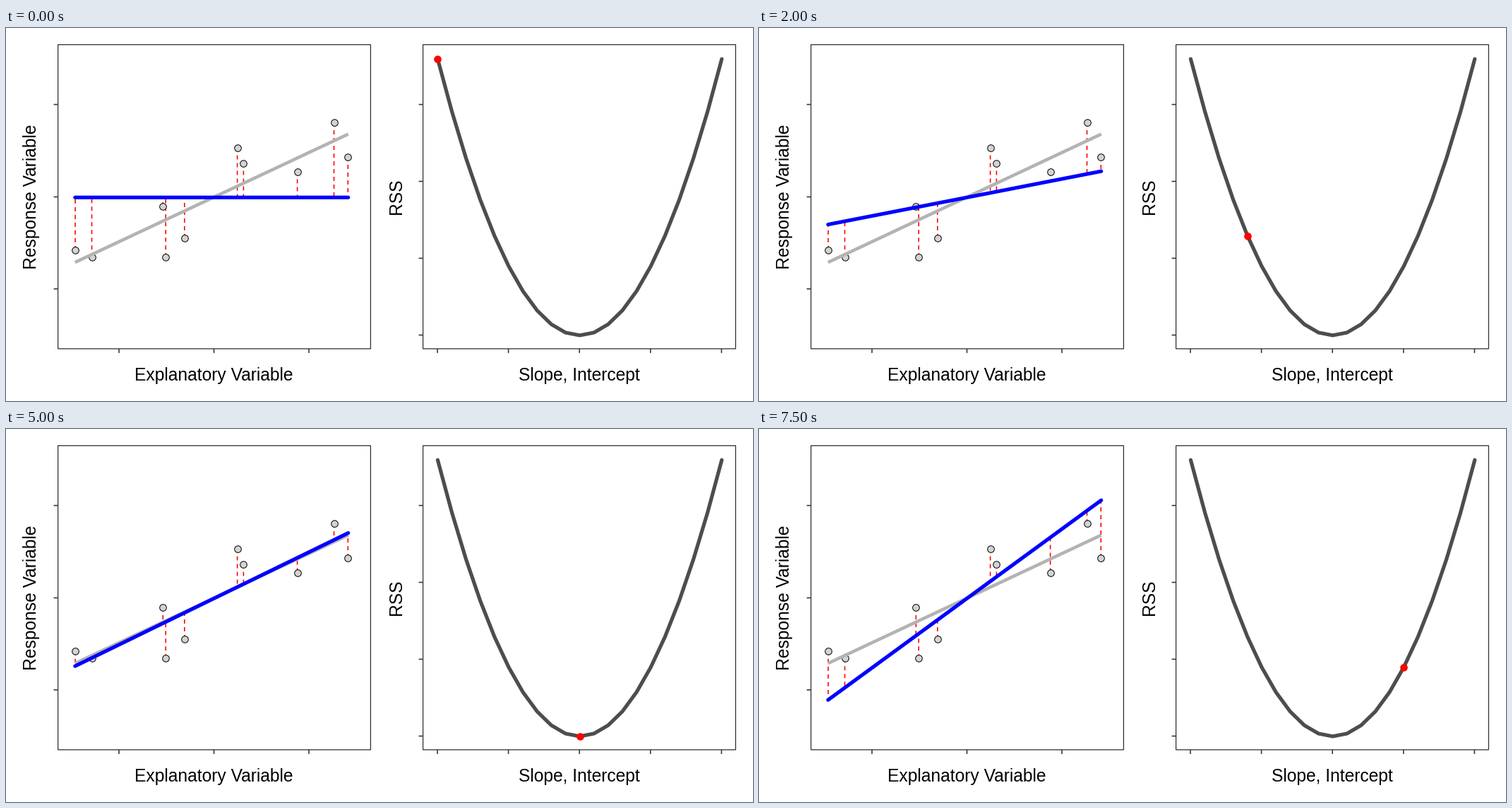
A matplotlib script for the animation above (8 s loop, 1058 by 529 pixels).

```python
import numpy as np
import matplotlib.pyplot as plt
from matplotlib.animation import FuncAnimation
from matplotlib.patches import Rectangle

W, H, DPI = 1058, 529, 100
PX = 72 / DPI  # points per pixel
STEPS, INTERVAL = 16, 500

plt.rcParams.update({
    "font.family": "Liberation Sans",
    "lines.scale_dashes": False,
    "path.snap": False,
})

fig = plt.figure(figsize=(W / DPI, H / DPI), dpi=DPI, facecolor="white")
ax = fig.add_axes([0, 0, 1, 1])
ax.set_xlim(0, W)
ax.set_ylim(H, 0)
ax.axis("off")

TOP, BOTTOM = 23.6, 454.9
INK = "#333333"


def stroke(x, y, color, width, **kw):
    kw.setdefault("solid_capstyle", "butt")
    return ax.plot(x, y, color=color, lw=width * PX, **kw)[0]


def panel(left, right, xticks, yticks):
    ax.add_patch(Rectangle((left, TOP), right - left, BOTTOM - TOP,
                           fill=False, ec=INK, lw=1.3 * PX, zorder=8))
    for x in xticks:
        stroke([x, x], [BOTTOM, BOTTOM + 6], INK, 1.6)
    for y in yticks:
        stroke([left - 6, left], [y, y], INK, 1.6)


def label(x, y, text, rotation=0):
    ax.text(x, y, text, size=24.6 * PX, color="black", rotation=rotation,
            ha="center", va="baseline", rotation_mode="anchor")


panel(73.6, 516.4, [160, 294.5, 429], [108.5, 239.5, 370])
panel(590.6, 1033.4, 611 + 100.6 * np.arange(5), 108.5 + 109 * np.arange(4))
label(294.2, 500, "Explanatory Variable")
label(811.7, 500, "Slope, Intercept")
label(42.7, 239, "Response Variable", 90)
label(560, 239, "RSS", 90)

# Scatter, best fit and the line that sweeps through the centre
CX, CY = 294.5, 240.3
SLOPE_STEP = 0.0488
px = np.array([98, 121.5, 222.3, 226.2, 252.8, 327.6, 336.4, 412.6, 464.5, 484.3])
py = np.array([315, 325.3, 253, 325.3, 298, 169.5, 191.5, 203.5, 134, 183])
ends = np.array([97.8, 484.7])

residuals = [stroke([x, x], [y, CY], "red", 1.6, zorder=2,
                    dashes=(6 * PX, 5 * PX), dash_capstyle="butt")
             for x, y in zip(px, py)]
ax.plot(px, py, "o", ms=9.6 * PX, mfc="#D3D3D3", mec="black",
        mew=1 * PX, zorder=3)
stroke(ends, 239.9 - 0.47 * (ends - CX), "#B3B3B3", 4.6, zorder=4)
fit = stroke(ends, [CY, CY], "blue", 5.2, zorder=5, solid_capstyle="round")

# Residual sum of squares
step = np.arange(21)
rss_x = 611.4 + 20.12 * step
rss_y = 435.9 - 392 * ((step - 10) / 10) ** 2
stroke(rss_x, rss_y, "#4D4D4D", 5.2, zorder=4, solid_capstyle="round")
dot, = ax.plot([], [], "o", color="red", ms=10.6 * PX, mew=0, zorder=6)


def line_y(x, k):
    return CY - SLOPE_STEP * k * (x - CX)


def update(k):
    fit.set_ydata(line_y(ends, k))
    for seg, x, y in zip(residuals, px, py):
        seg.set_ydata([y, line_y(x, k)])
    dot.set_data([rss_x[k]], [rss_y[k]])
    return [fit, dot, *residuals]


anim = FuncAnimation(fig, update, frames=STEPS, interval=INTERVAL,
                     init_func=lambda: update(0), repeat=True, repeat_delay=0)
plt.show()
```
